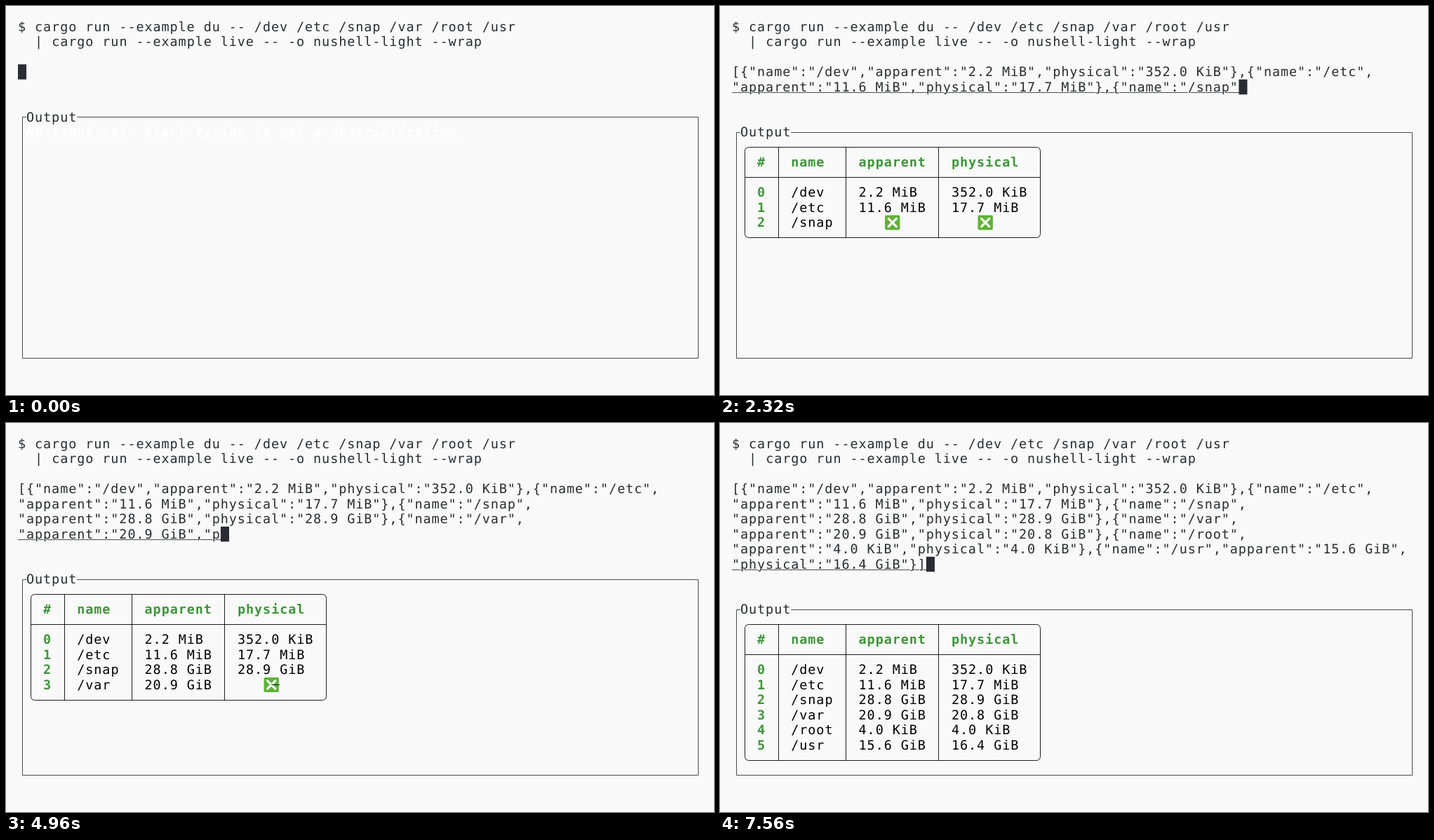
Recreate the animation shown at these times as an HTML page. Size 1009x555 px, loop 9.88 s.

```html
<!DOCTYPE html>
<html lang="en">
<head>
<meta charset="utf-8">
<title>Live deserialization</title>
<style>
  html, body { margin: 0; width: 100%; height: 100%; overflow: hidden; background: #f9f9f9; }
  svg { display: block; width: 1009px; height: 555px; }
  text {
    font: 18.47px "DejaVu Sans Mono", monospace;
    letter-spacing: 0.921px;
    white-space: pre;
    text-rendering: geometricPrecision;
    font-variant-ligatures: none;
    fill: #2a2c33;
  }
  .value { fill: #000; }
  .head { fill: #3f953a; font-weight: bold; }
  .hint { fill: #fff; font-weight: bold; font-style: italic; }
  .active { stroke: #f9f9f9; stroke-width: 2px; paint-order: stroke; }
  path { fill: none; stroke-width: 1; }
  .frame { stroke: #2a2c33; opacity: 0.85; }
  .grid { stroke: #000; opacity: 0.88; }
  .underline { stroke: #2a2c33; opacity: 0.85; }
  .cursor { fill: #2a2c33; }
  .cross { fill: #5fb336; }
  .cross-mark { stroke: #fff; stroke-width: 3.2; stroke-linecap: round; }
</style>
</head>
<body>
<svg id="screen" viewBox="0 0 1009 555"></svg>
<script>
const LOOP = 9880, TICK = 40;
const CELL_W = 12.04, CELL_H = 21.5, LEFT = 17, TOP = 18.75;
const WRAP = 80, INPUT_ROW = 3, BOTTOM_ROW = 22, RIGHT_COL = 80;

const usage = [
  ["/dev", "2.2 MiB", "352.0 KiB"],
  ["/etc", "11.6 MiB", "17.7 MiB"],
  ["/snap", "28.8 GiB", "28.9 GiB"],
  ["/var", "20.9 GiB", "20.8 GiB"],
  ["/root", "4.0 KiB", "4.0 KiB"],
  ["/usr", "15.6 GiB", "16.4 GiB"],
];
const json = JSON.stringify(
  usage.map(([name, apparent, physical]) => ({ name, apparent, physical })));

// start time, ticks, characters at the first and at the last tick
const bursts = [
  [1960, 10, 9, 136],
  [4040, 7, 137, 196],
  [4880, 11, 197, 315],
  [7440, 4, 316, json.length],
];

const colX = c => LEFT + c * CELL_W;
const rowY = r => TOP + r * CELL_H;
const midX = c => Math.floor(colX(c + 0.5)) + 0.5;
const midY = r => Math.floor(rowY(r + 0.5)) + 0.5;

const text = (col, row, str, cls = "") =>
  `<text class="${cls}" x="${colX(col)}" y="${rowY(row) + 17.1}">${str}</text>`;
const path = (cls, d) => `<path class="${cls}" d="${d}"/>`;

function typedCount(time) {
  let count = 0;
  for (const [start, ticks, from, to] of bursts) {
    if (time < start) break;
    const k = Math.min(1, Math.floor((time - start) / TICK) / (ticks - 1));
    count = Math.round(from + (to - from) * k);
  }
  return count;
}

function wrapLines(str) {
  const lines = [""];
  for (const part of str.match(/[^,]*,|[^,]+/g) || []) {
    const last = lines.length - 1;
    if (lines[last].length + part.length > WRAP) lines.push(part);
    else lines[last] += part;
  }
  return lines;
}

// Reads whatever fields are present in unfinished JSON.
function parse(str) {
  return str.split("{").slice(1).map(part =>
    Object.fromEntries([...part.matchAll(/"(\w+)":"([^"]*)/g)].map(m => [m[1], m[2]])));
}

function missing(col, row, stale) {
  const x = colX(col + 1), y = rowY(row + 0.5), a = 5.6;
  return `<rect class="cross" x="${x - 10.7}" y="${y - 10.4}" width="21.4" height="20.8" rx="1.8"/>` +
    path("cross-mark", `M${x - a} ${y - a}l${2 * a} ${2 * a}m0 ${-2 * a}l${-2 * a} ${2 * a}`) +
    (stale ? path("grid", `M${x} ${midY(row)}h${CELL_W}`) : "");
}

function gridLines(top, bottom, stops, sep) {
  const x0 = midX(1), x1 = midX(stops[stops.length - 1]);
  const y0 = midY(top), y1 = midY(bottom), r = 6;
  let d = `M${x0 + r} ${y0}H${x1 - r}Q${x1} ${y0} ${x1} ${y0 + r}V${y1 - r}Q${x1} ${y1} ${x1 - r} ${y1}` +
    `H${x0 + r}Q${x0} ${y1} ${x0} ${y1 - r}V${y0 + r}Q${x0} ${y0} ${x0 + r} ${y0}`;
  for (const c of stops.slice(0, -1)) d += `M${midX(c)} ${y0}V${y1}`;
  if (sep) d += `M${x0} ${midY(sep)}H${x1}`;
  return path("grid", d);
}

function table(records, top) {
  const keys = [...new Set(records.flatMap(Object.keys))];
  if (!keys.length) {
    return gridLines(top, top + records.length + 1, [5, 25]) + records.map((_, i) =>
      text(3, top + 1 + i, i, "head") + text(7, top + 1 + i, "{record 0 fields}", "value")).join("");
  }
  const stops = [5], first = top + 3;
  let out = text(3, top + 1, "#", "head");
  records.forEach((_, i) => out += text(3, first + i, i, "head"));
  for (const key of keys) {
    const col = stops[stops.length - 1] + 2;
    const width = Math.max(key.length, ...records.map(r => key in r ? r[key].length : 2));
    out += text(col, top + 1, key, "head");
    records.forEach((rec, i) => {
      out += key in rec
        ? text(col, first + i, rec[key], "value")
        : missing(col + Math.floor((width - 2) / 2), first + i, records.length > 3);
    });
    stops.push(col + width + 1);
  }
  return gridLines(top, first + records.length, stops, top + 2) + out;
}

function render(count) {
  const typed = json.slice(0, count);
  const lines = wrapLines(typed);
  const last = lines.length - 1, row = INPUT_ROW + last, len = lines[last].length;
  const box = row + 3;
  let out = text(0, 0, "$ cargo run --example du -- /dev /etc /snap /var /root /usr") +
    text(2, 1, "| cargo run --example live -- -o nushell-light --wrap");

  if (len) out += path("underline", `M${LEFT} ${Math.floor(rowY(row) + 18.75) + 0.5}H${colX(len)}`);
  lines.forEach((line, i) => out += text(0, INPUT_ROW + i, line, i === last ? "active" : ""));
  out += `<rect class="cursor" x="${colX(len)}" y="${rowY(row)}" width="${CELL_W}" height="${CELL_H}"/>`;

  out += path("frame", `M${colX(1)} ${midY(box)}H${midX(0)}V${midY(BOTTOM_ROW)}` +
    `H${midX(RIGHT_COL)}V${midY(box)}H${colX(7)}`) + text(1, box, "Output");
  out += count
    ? table(parse(typed), box + 1)
    : text(1, box + 1, "No input yet. Start typing to get a deserialization.", "hint");
  return out;
}

const screen = document.getElementById("screen");
const began = performance.now();
let shown = -1;

function draw() {
  const count = typedCount((performance.now() - began) % LOOP);
  if (count !== shown) {
    shown = count;
    screen.innerHTML = render(count);
  }
  requestAnimationFrame(draw);
}
draw();
</script>
</body>
</html>
```
